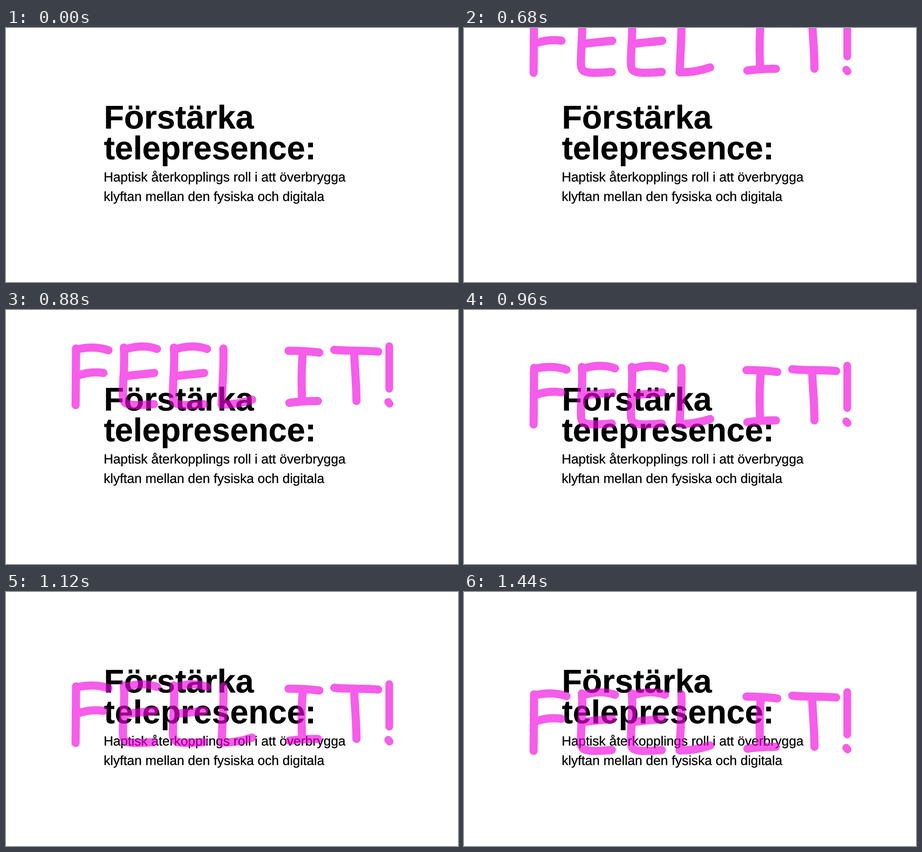
These frames come from a looping animation (997 by 561 pixels, 1.96 s). An HTML page:

```html
<!DOCTYPE html>
<html lang="sv">
<head>
<meta charset="utf-8">
<title>Feel it!</title>
<style>
  html, body { margin: 0; width: 100%; height: 100%; overflow: hidden; background: #fff; }
  svg { display: block; width: 997px; height: 561px; }
  text { font-family: "Liberation Sans", Arial, sans-serif; fill: #000; stroke: #000; stroke-width: .35; text-rendering: geometricPrecision; }
  .title { font-size: 72.6px; font-weight: 700; }
  .sub { font-size: 29.1px; }
  #ink { fill: none; stroke: rgb(241, 0, 222); stroke-width: 18; stroke-linecap: round; stroke-linejoin: round; opacity: .63; }
</style>
</head>
<body>
<svg viewBox="0 0 997 561">
  <text class="title" x="215.9" y="222">Förstärka</text>
  <text class="title" x="215.9" y="290">telepresence:</text>
  <text class="sub" x="215.4" y="339">Haptisk återkopplings roll i att överbrygga</text>
  <text class="sub" x="215.4" y="382.3">klyftan mellan den fysiska och digitala</text>
  <g id="ink" visibility="hidden">
    <path d="M154.5 226L153.5 351M155 228C178 223 205 222 226 230M155 287C175 279 195 277 215 280"/>
    <path id="e" d="M260 224C263 256 257 306 258 331C258 346 263 350 285 351Q305 351 326 349M260 229C285 220 310 219 333 227M259 288C280 284 305 283 327 280"/>
    <use href="#e" x="110.3"/>
    <path d="M479.5 226C481 266 477 311 475.5 350C500 350 520 347 543 339"/>
    <path d="M623 231C645 231 668 232 691 235M655 233C651 270 652 305 653 342M625 346C645 343 667 342 688 342"/>
    <path d="M724 229C750 232 790 230 821 233M768 233C769 271 773 301 773 342"/>
    <path stroke-width="17" d="M845.3 221V315M843 344L846 348"/>
  </g>
</svg>
<script>
  const LOOP = 1960, STEP = 40, ENTER = 520;
  const ink = document.getElementById('ink');

  // [time in ms, vertical distance from the resting place]
  const keys = [
    [520, -341], [680, -252], [880, -141], [1040, -56.5], [1120, -17.5],
    [1160, -1], [1200, 9.5], [1240, 14], [1320, 10.5], [1440, 0]
  ];

  function slope(i) {
    const a = keys[Math.max(i - 1, 0)], b = keys[Math.min(i + 1, keys.length - 1)];
    return (b[1] - a[1]) / (b[0] - a[0]);
  }

  // Cubic Hermite curve through the keys
  function drop(t) {
    const last = keys.length - 1;
    if (t >= keys[last][0]) return keys[last][1];
    let i = 0;
    while (t >= keys[i + 1][0]) i++;
    const [t0, y0] = keys[i], [t1, y1] = keys[i + 1];
    const d = t1 - t0, u = (t - t0) / d, v = 1 - u;
    return y0 * (1 + 2 * u) * v * v + y1 * (3 - 2 * u) * u * u
      + d * u * v * (slope(i) * v - slope(i + 1) * u);
  }

  function draw(ms) {
    const t = Math.floor((ms % LOOP) / STEP) * STEP;
    const shown = t >= ENTER;
    ink.setAttribute('visibility', shown ? 'visible' : 'hidden');
    if (shown) ink.setAttribute('transform', `translate(0 ${drop(t).toFixed(2)})`);
  }

  const start = performance.now();
  function tick() {
    draw(performance.now() - start);
    requestAnimationFrame(tick);
  }
  tick();
</script>
</body>
</html>
```
